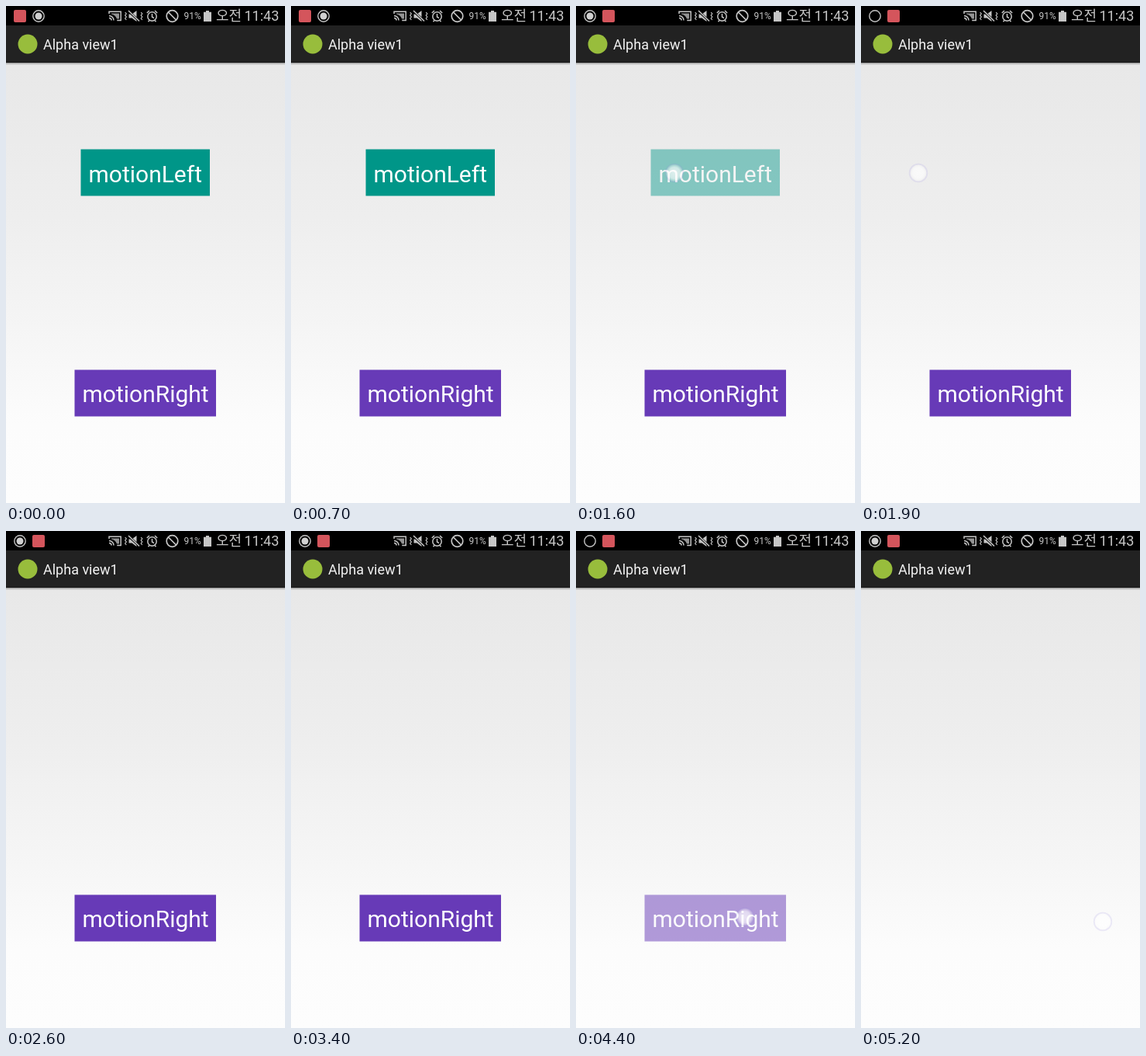
Recreate the animation shown at these times as an HTML page. Size 360 by 640 pixels, loop 5.3 s.

```html
<!DOCTYPE html>
<html lang="ko">
<head>
<meta charset="utf-8">
<title>Alpha view1</title>
<style>
  html, body { margin: 0; width: 100%; height: 100%; overflow: hidden; background: #fcfcfc; }
  svg { display: block; width: 360px; height: 640px; font-family: Roboto, sans-serif; }
  .label { font-size: 30px; fill: #fff; }
  .icons { fill: none; stroke: #c6c6c6; stroke-width: 1.5; }
  .solid { fill: #c6c6c6; stroke: none; }
  .clock { font-size: 18px; fill: #c6c6c6; }
</style>
</head>
<body>
<svg viewBox="0 0 360 640">
  <defs>
    <linearGradient id="page" x2="0" y2="1">
      <stop offset="0" stop-color="#e8e8e8"/>
      <stop offset=".35" stop-color="#eeeeee"/>
      <stop offset=".6" stop-color="#f5f5f5"/>
      <stop offset=".82" stop-color="#fcfcfc"/>
      <stop offset="1" stop-color="#fdfdfd"/>
    </linearGradient>
    <linearGradient id="shade" x2="0" y2="1">
      <stop offset="0" stop-opacity=".35"/>
      <stop offset="1" stop-opacity="0"/>
    </linearGradient>
    <radialGradient id="glow">
      <stop offset="0" stop-color="#fff" stop-opacity=".72"/>
      <stop offset=".65" stop-color="#fff" stop-opacity=".62"/>
      <stop offset="1" stop-color="#fff" stop-opacity=".12"/>
    </radialGradient>
    <radialGradient id="halo">
      <stop offset=".3" stop-color="#fff" stop-opacity=".2"/>
      <stop offset="1" stop-color="#fff" stop-opacity="0"/>
    </radialGradient>
  </defs>

  <rect y="73" width="360" height="567" fill="url(#page)"/>
  <rect y="73" width="360" height="3" fill="url(#shade)"/>
  <rect width="360" height="25" fill="#000"/>
  <rect y="25" width="360" height="48" fill="#222"/>
  <rect y="72" width="360" height="1" fill="#151515"/>
  <circle cx="28" cy="49" r="12.5" fill="#98bd3c"/>
  <text x="48" y="56" font-size="18" fill="#f3f3f3">Alpha view1</text>

  <rect id="app" x="-8" y="5" width="16" height="16" rx="2" fill="#d4555c"/>
  <g id="rec">
    <circle r="7.2" fill="none" stroke="#c6c6c6" stroke-width="1.4"/>
    <circle id="recDot" r="4.5" fill="#d0d0d0"/>
  </g>

  <g class="icons">
    <path d="M133 10V7.2h15.2v11.3h-5M133 12.5a6 6 0 0 1 6 6M133 15.5a3 3 0 0 1 3 3"/>
    <path class="solid" d="M136 9.5h10v7h-3a9 9 0 0 0-7-6z" opacity=".75"/>
    <path d="M153.7 8l1.6 2-1.6 2 1.6 2-1.6 2 1.6 2M174.2 8l1.6 2-1.6 2 1.6 2-1.6 2 1.6 2" stroke-width="1.2"/>
    <path class="solid" d="M158.5 10.5h4l6-4.5v14l-6-4.5h-4z"/>
    <path d="M158 6.5l14 13" stroke="#000" stroke-width="3"/>
    <path d="M158 6l14 13.5"/>
    <circle cx="188.5" cy="13.5" r="5.7"/>
    <path d="M188.5 10v4l2.5 1.6M181.8 9l3.2-3M195.2 9l-3.2-3M185 18.5l-1.5 1.7M192 18.5l1.5 1.7"/>
    <circle cx="214.5" cy="13" r="7.3" stroke-width="1.7"/>
    <path d="M209.5 8l10 10" stroke-width="1.7"/>
    <path class="solid" d="M258 6h4v1.7h3V20h-10V7.7h3z"/>
  </g>
  <text x="229.5" y="17" font-size="12" fill="#c6c6c6">91%</text>
  <text class="clock" x="271" y="19" style="font-family:'Noto Sans CJK KR','Noto Sans CJK',sans-serif">오전</text>
  <text class="clock" x="307.5" y="19">11:43</text>

  <g id="left">
    <rect x="96.5" y="184.5" width="166.5" height="60" fill="#009688"/>
    <text class="label" x="106.5" y="226.5">motionLeft</text>
  </g>
  <g id="right">
    <rect x="88.5" y="468.5" width="182.5" height="60" fill="#673ab7"/>
    <text class="label" x="98.5" y="510">motionRight</text>
  </g>
  <g id="touch">
    <circle id="press" r="23" fill="url(#halo)"/>
    <circle r="11.3" fill="url(#glow)" stroke="#9a8ee0" stroke-opacity=".17" stroke-width="1.8"/>
  </g>
</svg>
<script>
const LOOP = 5300, STEP = 100, FADE = 120;
const $ = id => document.getElementById(id);
const clamp = v => Math.max(0, Math.min(1, v));

// Finger paths: [time, x, y]
const swipeLeft = [[1000, 196, 214], [1200, 186, 214], [1400, 160, 214], [1600, 127, 215], [1800, 80, 215], [1900, 74, 215]];
const swipeRight = [[3600, 126, 491], [3800, 136, 495], [4000, 157, 497], [4400, 218, 497], [4800, 277, 499], [5000, 297, 501], [5200, 312, 503]];

function at(path, t) {
  const i = Math.max(1, path.findIndex(p => p[0] >= t));
  const [a, b] = t >= path.at(-1)[0] ? path.slice(-2) : [path[i - 1], path[i]];
  const k = clamp((t - a[0]) / (b[0] - a[0]));
  return [a[1] + (b[1] - a[1]) * k, a[2] + (b[2] - a[2]) * k];
}

const during = (t, from, to) => t >= from && t < to;
const show = (el, on) => el.setAttribute('visibility', on ? 'visible' : 'hidden');
const place = (el, x, y) => el.setAttribute('transform', `translate(${x} ${y})`);

function draw(now) {
  const t = Math.floor(now % LOOP / STEP) * STEP;
  const swapped = t >= 900;
  place($('app'), swapped ? 42 : 18, 0);
  place($('rec'), swapped ? 18 : 42, 13);
  show($('recDot'), !during(t, 1900, 2400) && !during(t, 4200, 4900));

  $('left').setAttribute('opacity', clamp((at(swipeLeft, t)[0] - 74) / FADE));
  $('right').setAttribute('opacity', clamp((278 - at(swipeRight, t)[0]) / FADE));

  const path = t < 2500 ? swipeLeft : swipeRight;
  const start = path[0][0];
  show($('touch'), during(t, start, path.at(-1)[0] + STEP));
  place($('touch'), ...at(path, t));
  $('press').setAttribute('opacity', clamp(1 - (t - start) / 600));
}

const begin = performance.now();
function tick() {
  draw(performance.now() - begin);
  requestAnimationFrame(tick);
}
tick();
</script>
</body>
</html>
```
